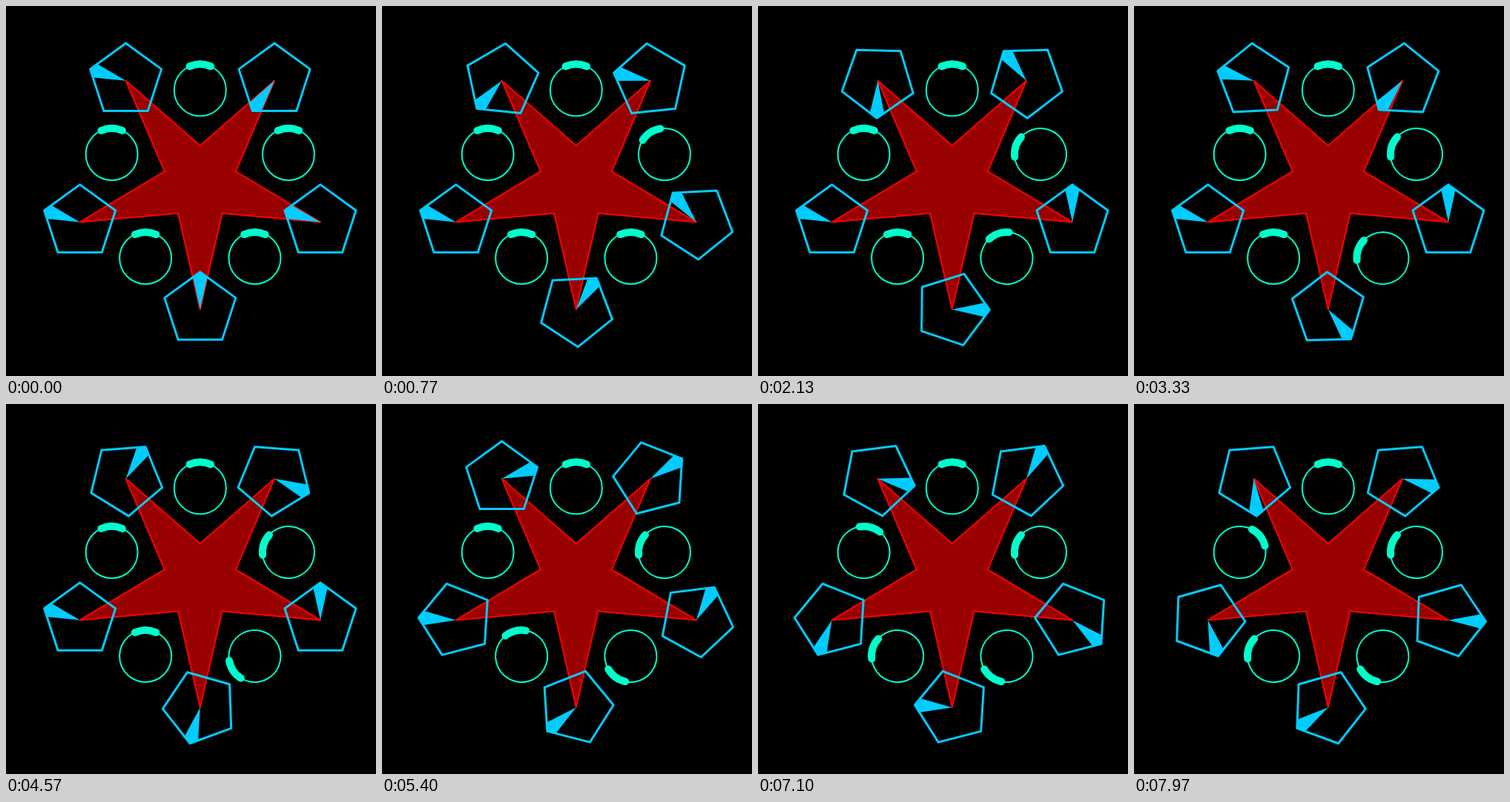
Write an HTML page that moves like this. It is 499x499 px and loops after 8 s.

```html
<!DOCTYPE html>
<html lang="en">
<head>
<meta charset="utf-8">
<title>Star gears</title>
<style>
  html, body { margin: 0; width: 100%; height: 100%; overflow: hidden; background: #000; }
  svg { display: block; width: 100vw; height: 100vh; }
</style>
</head>
<body>
<svg id="stage" viewBox="0 0 499 499" fill="none" stroke-linejoin="round" stroke-linecap="round"></svg>
<script>
const CENTER = [261.8, 238.7];
const TIP = 170.5, HUB = 50.5, RING = 125.3;
const RING_R = 35, ARC_HALF = 24;
const RATE = 0.03, TOTAL = 240;   // ticks per ms, ticks per loop
const STEP = 1.44;                // degrees per tick at single speed

// Angles run clockwise from straight up, in degrees.
const polar = (r, deg, [x, y] = [0, 0]) => {
  const a = deg * Math.PI / 180;
  return [x + r * Math.sin(a), y - r * Math.cos(a)];
};
const mix = (p, q, k) => p.map((v, i) => v + (q[i] - v) * k);
const fmt = pts => pts.map(p => p.map(v => v.toFixed(3)).join(',')).join(' ');
const range5 = fn => Array.from({ length: 5 }, (_, i) => fn(i));

const stage = document.getElementById('stage');
function add(parent, tag, attrs = {}) {
  const el = document.createElementNS('http://www.w3.org/2000/svg', tag);
  for (const key in attrs) el.setAttribute(key, attrs[key]);
  return parent.appendChild(el);
}

// Pentagons sit on the star tips, rings between them, both clockwise from the top.
const gearSpots = range5(i => polar(TIP, 36 + 72 * i, CENTER));
const ringSpots = range5(i => polar(RING, 72 * i, CENTER));
const gearStart = [216, 288, 0, 288, 288];

// speeds of the pentagons in units of STEP; one ring turns per stage
const stages = [
  { from: 0,   ticks: 50,  gears: [2, 1, 1, 0, -2],   ring: 1, dir: -1 },
  { from: 51,  ticks: 100, gears: [-2, 0, 1, 0, 2],   ring: 2, dir: -1 },
  { from: 152, ticks: 50,  gears: [-1, 2, 1, -1, 0],  ring: 3, dir: -1 },
  { from: 203, ticks: 50,  gears: [2, -1, -1, -1, 2], ring: 4, dir: 1 }
];

add(stage, 'polygon', {
  points: fmt(range5(i => [polar(HUB, 72 * i, CENTER), gearSpots[i]]).flat()),
  fill: '#900', stroke: '#f00', 'stroke-width': 2
});

const rings = ringSpots.map(() => {
  const g = add(stage, 'g', { stroke: '#0fc' });
  add(g, 'circle', { r: RING_R, 'stroke-width': 2 });
  const [a, b] = [-ARC_HALF, ARC_HALF].map(d => fmt([polar(RING_R, d)]));
  add(g, 'path', { d: `M${a} A${RING_R},${RING_R} 0 0 1 ${b}`, 'stroke-width': 10 });
  return g;
});

const corners = range5(i => polar(HUB, 72 * i));
const gears = gearSpots.map(() => {
  const g = add(stage, 'g');
  const wedge = [[0, 0], mix(corners[0], corners[4], 0.2), corners[0], mix(corners[0], corners[1], 0.2)];
  add(g, 'polygon', { points: fmt(wedge), fill: '#0cf' });
  add(g, 'polygon', { points: fmt(corners), stroke: '#0cf', 'stroke-width': 3 });
  return g;
});

const place = (el, [x, y], deg) =>
  el.setAttribute('transform', `translate(${x.toFixed(3)} ${y.toFixed(3)}) rotate(${deg.toFixed(3)})`);

function draw(ms) {
  const tick = Math.floor((ms + 3.5) * RATE) % TOTAL;
  const gearTurn = [...gearStart];
  const ringTurn = [0, 0, 0, 0, 0];
  for (const s of stages) {
    const turn = STEP * Math.min(Math.max(tick - s.from, 0), s.ticks);
    s.gears.forEach((speed, i) => { gearTurn[i] += speed * turn; });
    ringTurn[s.ring] += s.dir * turn;
  }
  gears.forEach((g, i) => place(g, gearSpots[i], gearTurn[i]));
  rings.forEach((g, i) => place(g, ringSpots[i], ringTurn[i]));
}

const start = performance.now();
function loop() {
  draw(performance.now() - start);
  requestAnimationFrame(loop);
}
loop();
</script>
</body>
</html>
```
